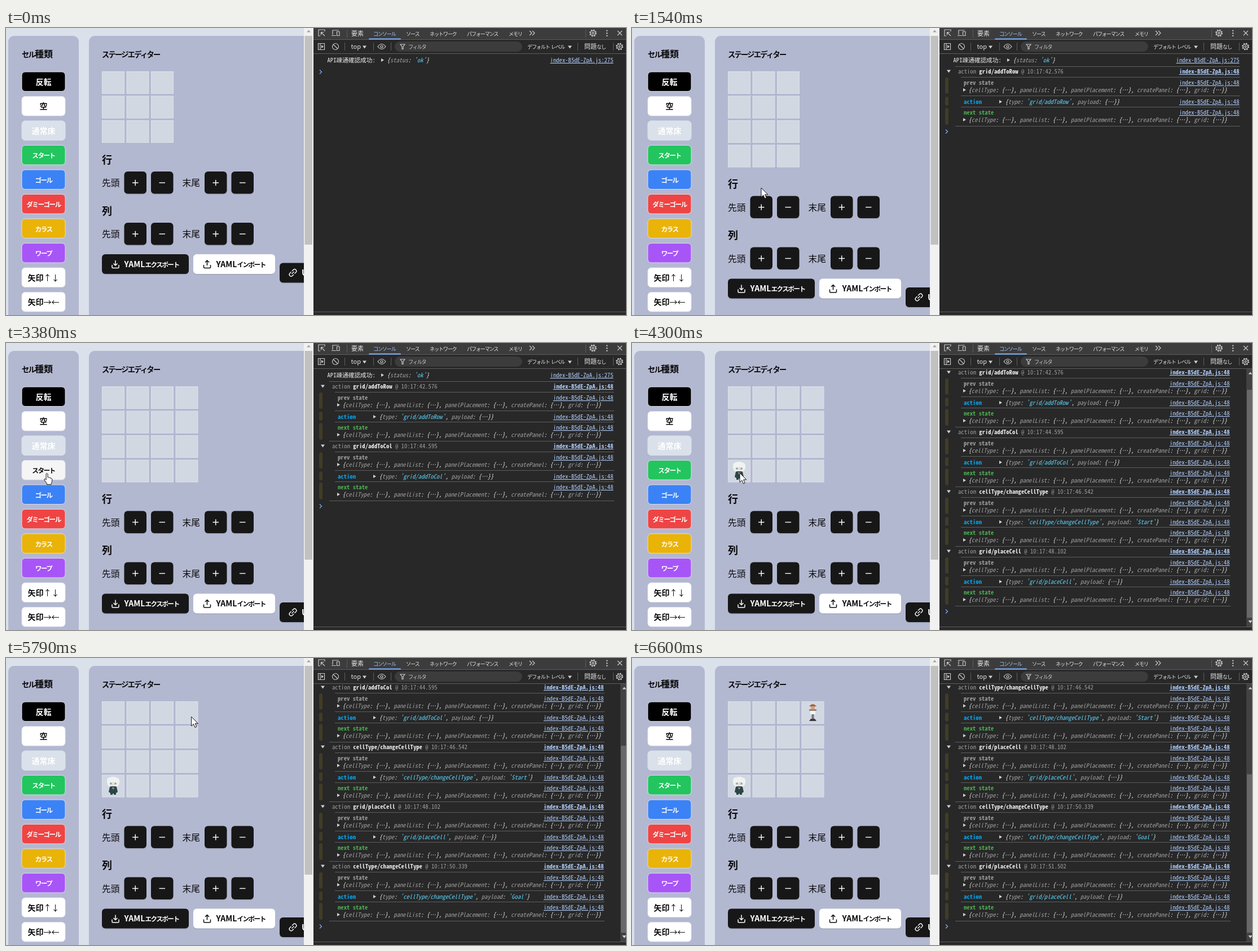
An HTML page that plays this animation: 1099 px wide and 510 px high, repeating every 6780 ms.

```html
<!DOCTYPE html>
<html lang="ja">
<head>
<meta charset="utf-8">
<title>ステージエディター</title>
<style>
  html, body { margin: 0; height: 100%; overflow: hidden; background: #dae1ea; }
  svg { display: block; width: 100vw; height: 100vh; }
  text { font-family: "Noto Sans CJK JP", "Noto Sans", sans-serif; white-space: pre; }
  .kana { font-size: .83em; letter-spacing: -.132em; }
  .thin { font-weight: 400; }
  .log { font: 500 10.667px "Noto Sans Mono CJK JP", "Noto Sans Mono", monospace; fill: #ececec; }
  .b { font-weight: 700; }
  .obj { font-style: italic; }
  .dim { fill: #a0a0a0; }
  .str { fill: #5cd5fb; }
  .link { fill: #b0cdfc; text-decoration: underline 1px; text-underline-offset: 1px; text-anchor: end; }
  .icon { fill: none; stroke: #c7c7c7; stroke-width: 1.2; }
</style>
</head>
<body>
<svg id="stage" viewBox="0 0 1099 510"></svg>
<script>
const LOOP = 6780, PITCH = 43.5, INK = '#0a0a0a', DARK = '#171717';
const stage = document.getElementById('stage');

// Pointer legs: start, end, x, y and an optional bend; each leg takes 7 steps
const START = [1218, 570];
const LEGS = [
  [210, 820, 225, 285], [920, 921, 229, 284], [1740, 2360, 235, 405],
  [2870, 3480, 68, 228], [3580, 4200, 191, 231], [4500, 5070, 70, 268, 50, 478],
  [5280, 5890, 334, 101], [5990, 6600, 960, 530]
];

const CELLS = [
  ['反転', '#000', '#fff'], ['空', '#fff', INK], ['通常床', '#dae1ea', '#fff'],
  ['スタート', '#22c55e', '#fff'], ['ゴール', '#3b82f6', '#fff'], ['ダミーゴール', '#ef4444', '#fff'],
  ['カラス', '#eab308', '#fff'], ['ワープ', '#a855f7', '#fff'],
  ['矢印↑↓', '#fff', INK], ['矢印→←', '#fff', INK]
];

// Console entries: time shown, action, clock, payload
const LOG = [
  [1540, 'grid/addToRow', '42.576', '{…}'], [2560, 'grid/addToCol', '44.595', '{…}'],
  [3480, 'cellType/changeCellType', '46.542', "'Start'"], [4300, 'grid/placeCell', '48.102', '{…}'],
  [5380, 'cellType/changeCellType', '50.339', "'Goal'"], [5990, 'grid/placeCell', '51.502', '{…}']
];
const STATE = '{cellType: {…}, panelList: {…}, panelPlacement: {…}, createPanel: {…}, grid: {…}}';

const rect = (x, y, w, h, fill, r = 0, more = '') =>
  `<rect x="${x}" y="${y}" width="${w}" height="${h}" rx="${r}" fill="${fill}" ${more}/>`;
const path = (d, fill, more = '') => `<path d="${d}" fill="${fill}" ${more}/>`;
const icon = d => `<path class="icon" d="${d}"/>`;
const line = (x, y, x2, y2 = y) => path(`M${x} ${y}L${x2} ${y2}`, 'none', 'stroke="#5e5e5e"');
const jp = (x, y, s, size, fill, more = '') =>
  `<text x="${x}" y="${y}" font-size="${size}" fill="${fill}" ${more}>` +
  s.replace(/[ぁ-んァ-ヶー]+/g, '<tspan class="kana">$&</tspan>')
    .replace(/[↑↓→←]+/g, '<tspan class="thin">$&</tspan>') + '</text>';
const log = (x, y, s, cls = '', more = '') => `<text class="log ${cls}" x="${x}" y="${y}" ${more}>${s}</text>`;
const obj = (x, y, s) => log(x, y, s.replace(/'[^']*'|\w+(?=:)/g,
  m => `<tspan class="${m[0] === "'" ? 'str' : 'dim'}">${m}</tspan>`), 'obj');
const right = (x, y) => path(`M${x} ${y - 3}l5 3l-5 3z`, '#d0d0d0');
const down = (x, y) => path(`M${x} ${y - 2.5}h7l-3.5 5z`, '#d0d0d0');
const BOLD = 'font-weight="700"', MID = BOLD + ' text-anchor="middle"', WHITE = 'stroke="#fff" stroke-width="1.4"';

function pointer(t) {
  let [x, y] = START;
  for (const [a, b, ex, ey, bx = (x + ex) / 2, by = (y + ey) / 2] of LEGS) {
    if (t < a) break;
    const step = Math.min(6, Math.floor((t - a) / (b - a) * 6 + .02)) + 1;
    const u = 1 - (1 - step / 7) ** 2, v = 1 - u;
    x = v * v * x + 2 * u * v * bx + u * u * ex;
    y = v * v * y + 2 * u * v * by + u * u * ey;
  }
  return [x, y];
}

function editor(t, px, py) {
  let hand = false;
  const over = (x, y, w, h) => {
    const hit = px >= x && px <= x + w && py >= y && py <= y + h;
    hand = hand || hit;
    return hit;
  };
  const shadow = (x, y, w, h) => rect(x, y + 1.5, w, h, '#000', 6, 'opacity=".1"');
  const rows = t < 1420 ? 3 : 4, cols = t < 2460 ? 3 : 4;

  let s = rect(0, 0, 545, 510, '#dae1ea') + rect(4, 14, 125, 520, '#b3b8d1', 10) +
    rect(147, 14, 420, 520, '#b3b8d1', 10) +
    jp(28, 51.5, 'セル種類', 16, INK, BOLD) + jp(170, 51.5, 'ステージエディター', 16, INK, BOLD);

  CELLS.forEach(([name, fill, ink], i) => {
    const y = 78 + i * PITCH, hot = over(28, y, 77, 35);
    s += rect(28, y, 77, 34.5, hot ? '#f5f5f5' : fill, 6, 'stroke="#dfe4ed" stroke-width=".9"') +
      jp(66.5, y + 22.5, name, 14, hot ? INK : ink, MID);
  });

  for (let r = 0; r < rows; r++)
    for (let c = 0; c < cols; c++)
      s += rect(170.5 + c * PITCH, 77.5 + r * PITCH, 39, 39, '#d2d8e2', 0, 'stroke="#dde2ea"');
  if (t >= 4300) s += hero();
  if (t >= 5990) s += lamp();

  const dy = (rows - 3) * PITCH;
  ['行', '列'].forEach((name, i) => {
    const y = 255 + dy + i * 91;
    s += jp(170, y - 14.5, name, 18, INK, BOLD) +
      jp(170, y + 26, '先頭', 15.7, INK) + jp(312.5, y + 26, '末尾', 15.7, INK);
    [209.5, 257, 352, 399.5].forEach((x, j) => {
      s += shadow(x, y, 39.5, 39.5) +
        rect(x, y, 39.5, 39.5, over(x, y, 39.5, 39.5) ? '#2c2c30' : DARK, 6) +
        path(`M${x + 14.5} ${y + 20}h10.5` + (j % 2 ? '' : 'm-5.25 -5.25v10.5'), 'none', WHITE);
    });
  });

  const y = 402 + dy;
  const tray = (x, color, up) => path(`M${x - 6} ${y + 19}v4q0 1.5 1.5 1.5h9q1.5 0 1.5-1.5v-4` +
    `M${x} ${y + 11}v9M${x - 3.5} ${y + (up ? 14.5 : 16.5)}l3.5 ${up ? -3.5 : 3.5}l3.5 ${up ? 3.5 : -3.5}`,
    'none', `stroke="${color}" stroke-width="1.5"`);
  s += shadow(170, y, 154, 35) + rect(170, y, 154, 35, DARK, 6) + tray(194, '#fff', false) +
    jp(209.5, y + 22.5, 'YAMLエクスポート', 14, '#fff', BOLD) +
    shadow(332, y, 145, 35) + rect(332, y, 145, 35, '#fff', 6) + tray(356.5, INK, true) +
    jp(372.5, y + 22.5, 'YAMLインポート', 14, INK, BOLD) +
    shadow(485, y + 15.5, 100, 35) + rect(485, y + 15.5, 100, 35, DARK, 6) +
    `<g transform="translate(508.5 ${y + 33}) rotate(-45)">` +
    path('M-1 -3.2h-3.3a3.2 3.2 0 0 0 0 6.4h3.3M1 -3.2h3.3a3.2 3.2 0 0 1 0 6.4h-3.3M-3 0h6', 'none', WHITE) + '</g>' +
    jp(524, y + 38, 'URL', 14, '#fff', BOLD);

  s += rect(528, 0, 17, 510, '#f1f1f1') + rect(529.5, 14, 13.5, 371, '#c1c1c1') +
    path('M533 7.5l3.5-4l3.5 4z', '#a3a3a3');
  return [s, hand];
}

const hero = () => path('M184 229q6-4 12 0l2 9l-3 2v3h-4v-2h-2v2h-4v-3l-3-2z', '#2c4549') +
  path('M187.500 230l2.500 4l2.500-4z', '#a8966a') +
  path('M179 219q-1-6 6-7q5-2 10 0q7 1 6 8q0 6-4 8h-14q-4-2-4-9z', '#f1f3f1') +
  path('M183 222q7-3 14 0v3q-7 4-14 0z', '#e6dedb') +
  rect(184.5, 221.5, 3, 3, '#7f9fbb', 1) + rect(192.5, 221.5, 3, 3, '#7f9fbb', 1);

const lamp = () => path('M314 86q6.5-8 13 0z', '#a8643f') + rect(317, 86, 7, 6, '#d9a07a') +
  rect(314, 91, 13, 3, '#8d8480', 1) + rect(316, 94, 9, 6, '#f5f3ef') +
  rect(318.5, 100, 4, 8, '#77757a') + path('M314 112l3-4h7l3 4z', '#3d3a3e');

function gear(x, y) {
  return `<g class="icon"><circle cx="${x}" cy="${y}" r="5.5" stroke-width="2" stroke-dasharray="2.3 2.02"/>` +
    `<circle cx="${x}" cy="${y}" r="4.3"/><circle cx="${x}" cy="${y}" r="1.6"/></g>`;
}

function toolbar() {
  const TABS = [[612, '要素'], [651, 'コンソール'], [709, 'ソース'], [751, 'ネットワーク'], [817, 'パフォーマンス'], [891, 'メモリ']];
  let s = rect(545, 0, 554, 20, '#3c3c3c') + rect(545, 20, 554, 26, '#282828') +
    line(545, 20.5, 1099) + line(545, 45.5, 1099);
  TABS.forEach(([x, name], i) => { s += jp(x, 13.5, name, 11, i === 1 ? '#a8c7fa' : '#e3e3e3'); });
  s += rect(643, 18.5, 57, 2, '#7cacf8', 1) +
    icon('M557 14h-3v-11h11v3M558.5 7.5l6.5 6.5M558.5 12.5v-5h5') +
    icon('M579 12v-8h11M577 13.5h8M586.5 6.5h4.5v7h-4.5z') +
    icon('M928 5l4 4l-4 4M933 5l4 4l-4 4') + gear(1040.5, 9) +
    [4.5, 9, 13.5].map(y => rect(1064, y - 1, 2.4, 2.4, '#c7c7c7', 1.2)).join('') +
    icon('M1084 5l8 8m0-8l-8 8');
  for (const x of [604.5, 1027.5]) s += line(x, 3, x, 17);
  for (const x of [600.5, 651.5, 682.5, 1013.5, 1076.5]) s += line(x, 26, x, 40);
  return s + icon('M553.5 27.5h11v11h-11zM557 27.5v11') + path('M559 30l4 3l-4 3z', '#c7c7c7') +
    icon('M578.5 33a5.5 5.5 0 1 0 11 0a5.5 5.5 0 1 0 -11 0M580 29l8 8') +
    jp(611.5, 37, 'top', 11, '#e3e3e3') + down(632, 34) +
    icon('M659 33q7-9 14 0q-7 9-14 0zM664 33a2 2 0 1 0 4 0a2 2 0 1 0 -4 0') +
    rect(689, 24, 226, 18, '#3c3c3c', 9) + icon('M699 29h8l-3 4v4.5h-2v-4.5z') +
    jp(713, 37, 'フィルタ', 11, '#c7c7c7') + jp(924, 37, 'デフォルト レベル', 11, '#e3e3e3') + down(996, 34) +
    jp(1025, 37, '問題なし', 11, '#e3e3e3') + gear(1087.5, 33);
}

function entry(i, y, edge) {
  const [, name, clock, payload] = LOG[i];
  const link = (dy, cls = '') => log(edge - 1.5, y + dy, 'index-B5dE-ZpA.js:48', 'link ' + cls);
  const label = (dy, text, color) => log(588, y + dy, text, 'b', `style="fill:${color}"`) + link(dy);
  let s = line(573, y - 8.5, edge) + down(558, y) +
    log(578, y + 4, `<tspan class="dim">action</tspan> <tspan class="b">${name}</tspan> <tspan class="dim">@ 10:17:${clock}</tspan>`) +
    link(4, 'b');
  for (const [top, h] of [[11, 29], [45, 16], [65, 30]]) s += rect(555, y + top, 6, h, '#413c26', 3);
  for (const dy of [10.5, 43.5, 63.5]) s += line(583, y + dy, edge);
  return s + label(24, 'prev state', '#9e9e9e') + right(587, y + 33) + obj(596.5, y + 37, STATE) +
    label(58, 'action', '#03a9f4') + right(651, y + 54) +
    obj(661.5, y + 58, `{type: '${name}', payload: ${payload}}`) +
    label(77, 'next state', '#4caf50') + right(587, y + 86) + obj(596.5, y + 90, STATE);
}

function consolePane(t) {
  const n = LOG.filter(e => t >= e[0]).length;
  const scroll = n < 4 ? 0 : 25 + (n - 4) * 106, edge = scroll ? 1061 : 1078;
  let s = rect(545, 46, 554, 464, '#282828') + log(569.5, 61 - scroll, 'API疎通確認成功:') +
    right(665, 57 - scroll) + obj(675.5, 61 - scroll, "{status: 'ok'}") +
    log(edge - 1.5, 61 - scroll, 'index-B5dE-ZpA.js:275', 'link');
  for (let i = 0; i < n; i++) s += entry(i, 77 + i * 106 - scroll, edge);
  const end = 78 + n * 106 - scroll;
  if (n) s += line(573, end - 9.5, edge);
  s += path(`M556 ${end - 3.5}l3.5 3.5l-3.5 3.5`, 'none', 'stroke="#7cacf8" stroke-width="1.3"');
  if (scroll) {
    const h = 427 * 458 / (458 + scroll);
    s += rect(1089, 46, 10, 458, '#424242') + rect(1090, 488 - h, 9, h, '#686868') +
      path('M1092.5 55.5h7l-3.5-4z', '#d0d0d0') + down(1092.5, 495.5);
  }
  return s + rect(545, 504, 554, 6, '#282828') + line(545, 504.5, 1099) + toolbar();
}

function cursor(x, y, hand) {
  const d = hand
    ? 'M0 .5q1.8-1.2 2.7 .8v6q1.6-.9 2.5 .6q1.5-.8 2.5 .7q2-.5 2.5 1.4v4q0 2-1.5 4v2h-7.5v-2q-2.5-3-4.7-6.5q-.4-2 1.5-1.7l1.7 1.7v-9.5z'
    : 'M0 0v16.5l3.8-3.6l2.6 6l2.8-1.2l-2.6-5.8h5.2z';
  return `<g transform="translate(${x.toFixed(1)} ${y.toFixed(1)})">` +
    path(d, '#fff', 'stroke="#111" stroke-linejoin="round"') + '</g>';
}

let shown = '';
function frame(now) {
  const t = now % LOOP, visible = t >= 210 && t < 6600;
  const [x, y] = visible ? pointer(t) : [-99, -99];
  const [left, hand] = editor(t, x, y);
  const scene = left + consolePane(t) + (visible ? cursor(x, y, hand) : '');
  if (scene !== shown) stage.innerHTML = shown = scene;
}

const begin = performance.now();
function tick() {
  frame(performance.now() - begin);
  requestAnimationFrame(tick);
}
tick();
</script>
</body>
</html>
```
